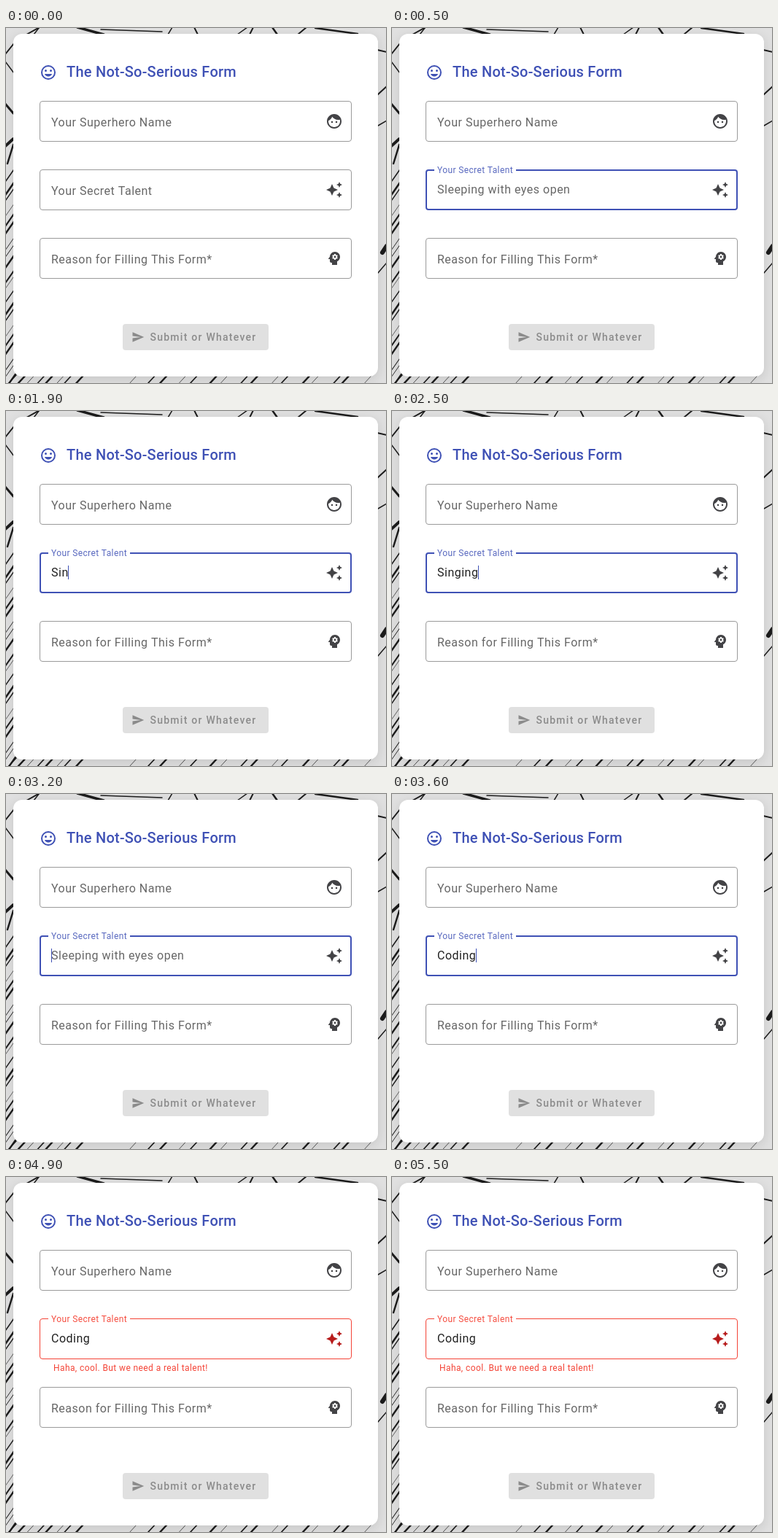
An HTML page with a canvas that plays this animation: 521x487 px, repeating every 5700 ms.

```html
<!DOCTYPE html>
<html lang="en">
<head>
<meta charset="utf-8">
<title>Form</title>
<style>
html, body { margin: 0; width: 100%; height: 100%; overflow: hidden; background: #e0e0e0; }
canvas { display: block; }
</style>
</head>
<body>
<canvas id="stage" width="521" height="487"></canvas>
<script>
const ctx = document.getElementById('stage').getContext('2d');
const LOOP = 5700, STEP = 100;
const FOCUS = 50, BLUR = 4050;
const INDIGO = '#3f51b5', RED = '#f44336', ICON = '#434346';
const MUTED = 'rgba(0,0,0,.6)', INK = 'rgba(0,0,0,.87)';

// Input value from each time on
const TYPING = [
  [0, ''], [1700, 'S'], [1800, 'Si'], [1900, 'Sin'], [2000, 'Sing'],
  [2100, 'Singi'], [2300, 'Singin'], [2500, 'Singing'],
  [2800, 'Singin'], [3000, 'S'], [3200, ''],
  [3300, 'C'], [3400, 'Co'], [3500, 'Codi'], [3600, 'Coding']
];

const SEND = new Path2D('M2.01 21 23 12 2.01 3 2 10l15 2-15 2z');
const FACE = new Path2D('M12 2C6.48 2 2 6.48 2 12s4.48 10 10 10 10-4.48 10-10S17.52 2 12 2z' +
  'm0 18c-4.41 0-8-3.59-8-8 0-.29.02-.58.05-.86 2.36-1.05 4.23-2.98 5.21-5.37' +
  'C11.07 8.33 14.05 10 17.42 10c.78 0 1.53-.09 2.25-.26.21.71.33 1.47.33 2.26 0 4.41-3.59 8-8 8z');
const SPARKLE = new Path2D('M19 9l1.25-2.75L23 5l-2.75-1.25L19 1l-1.25 2.75L15 5l2.75 1.25z' +
  'M11.5 9.5L9 4 6.5 9.5 1 12l5.5 2.5L9 20l2.5-5.5L17 12z' +
  'M19 15l-1.25 2.75L15 19l2.75 1.25L19 23l1.25-2.75L23 19l-2.75-1.25z');
const HEAD = new Path2D('M13 3C9.25 3 6.2 5.94 6.02 9.64L4.1 12.2c-.25.33-.01.8.4.8H6v3' +
  'c0 1.1.9 2 2 2h1v3h7v-4.68c2.36-1.12 4-3.53 4-6.32 0-3.87-3.13-7-7-7z');
const SMILE = new Path2D('M12 17.5c2.33 0 4.31-1.46 5.11-3.5H6.89c.8 2.04 2.78 3.5 5.11 3.5z');

const clamp = v => Math.min(1, Math.max(0, v));
const ease = p => p * p * (3 - 2 * p);

function text(str, x, y, size, color, spacing, weight = 400) {
  ctx.font = `${weight} ${size}px Roboto, sans-serif`;
  ctx.letterSpacing = spacing + 'px';
  ctx.fillStyle = color;
  ctx.fillText(str, x, y);
  return ctx.measureText(str).width;
}

function line(x1, y1, x2, y2, w) {
  ctx.lineWidth = w;
  ctx.beginPath();
  ctx.moveTo(x1, y1);
  ctx.lineTo(x2, y2);
  ctx.stroke();
}

function dot(x, y, r) {
  ctx.beginPath();
  ctx.arc(x, y, r, 0, Math.PI * 2);
  ctx.fill();
}

// Runs a drawing on a 24-unit icon grid
function icon(x, y, size, color, draw) {
  ctx.save();
  ctx.translate(x, y);
  ctx.scale(size / 24, size / 24);
  ctx.fillStyle = ctx.strokeStyle = color;
  draw();
  ctx.restore();
}

function mood() {
  ctx.lineWidth = 2;
  ctx.beginPath();
  ctx.arc(12, 12, 9, 0, Math.PI * 2);
  ctx.stroke();
  dot(8.5, 9.5, 1.5);
  dot(15.5, 9.5, 1.5);
  ctx.fill(SMILE);
}

function face() {
  ctx.fill(FACE, 'evenodd');
  dot(9, 13, 1.25);
  dot(15, 13, 1.25);
}

function mind() {
  ctx.fill(HEAD);
  ctx.fillStyle = ctx.strokeStyle = '#fff';
  dot(13, 10, 3);
  for (let i = 0; i < 6; i++) {
    const a = Math.PI * (i / 3 + 1 / 6 + 1 / 3);
    line(13, 10, 13 + 3.9 * Math.cos(a), 10 + 3.9 * Math.sin(a), 2);
  }
  ctx.fillStyle = ICON;
  dot(13, 10, 1.43);
}

function backdrop() {
  ctx.fillStyle = '#e0e0e0';
  ctx.fillRect(0, 0, 521, 487);
  ctx.strokeStyle = '#1c1c1c';
  ctx.lineCap = 'round';
  [
    [28, 9, 46, -1, 2], [38, 9, 45, 0, 1.5], [98, -1, 134, 9, 3.5],
    [130, 2, 214, 5, 1.5], [228, -1, 222, 9, 1.5], [258, -1, 263, 9, 2],
    [317, 9, 331, -1, 1.5], [339, -1, 334, 9, 2], [365, -1, 372, 9, 2.5],
    [400, 9, 412, -1, 2], [424, 0, 482, 8, 2.5],
    [509, 30, 522, 33, 2], [509, 92, 522, 80, 2], [510, 134, 522, 127, 1.5],
    [516, 308, 522, 299, 6], [510, 336, 522, 322, 1.5],
    [-1, 36, 11, 21, 2], [-1, 46, 11, 62, 1.5], [-1, 104, 10, 117, 3],
    [-1, 162, 10, 152, 4], [2, 186, 10, 160, 2.5]
  ].forEach(s => line(...s));
  // Diagonal hatching down the left side and along the bottom
  for (let i = 0; i < 20; i++) {
    const y = 204 + i * 15 + 4 * Math.sin(i * 2.3);
    line(-3, y + 10, 13, y - 13, 1.6 + Math.sin(i * 1.7));
  }
  for (let i = 0; i < 24; i++) {
    const x = 8 + i * (i < 8 ? 13 : 21) + 6 * Math.sin(i * 3.1);
    line(x - 6, 489, x + 6, 476, 1.6 + Math.sin(i * 2.1));
  }
  ctx.lineCap = 'butt';
}

function card() {
  ctx.save();
  ctx.shadowColor = 'rgba(0,0,0,.12)';
  ctx.shadowBlur = 16;
  ctx.shadowOffsetY = 4;
  ctx.fillStyle = '#fff';
  ctx.beginPath();
  ctx.roundRect(10, 8, 500, 470, 12);
  ctx.fill();
  ctx.restore();
}

function outline(y, color, w) {
  ctx.strokeStyle = color;
  ctx.lineWidth = w;
  ctx.beginPath();
  ctx.roundRect(46 + w / 2, y + w / 2, 428 - w, 56 - w, 4 - w / 2);
  ctx.stroke();
}

function plainField(y, label, draw) {
  outline(y, '#9a9a9a', 1);
  text(label, 62, y + 35, 16, MUTED, 0.5);
  icon(438, y + 16, 24, ICON, draw);
}

function caretOn(t) {
  if (t < FOCUS || t >= BLUR) return false;
  if (t < 1700) return t < 500 || (t >= 1000 && t < 1500);
  return true;
}

function talentField(t) {
  const value = TYPING.filter(k => k[0] <= t).pop()[1];
  const focused = t >= FOCUS && t < BLUR, failed = t >= BLUR;
  const lift = ease(clamp((t - FOCUS) / 150));

  outline(194, failed ? RED : focused ? INDIGO : '#9a9a9a', focused ? 2 : 1);
  if (t >= FOCUS) {
    ctx.fillStyle = '#fff';
    ctx.fillRect(58, 193, 112, 4);
  }

  const tint = failed ? 'rgba(244,67,54,.95)' : focused ? 'rgba(63,81,181,.87)' : MUTED;
  const size = 16 - 4 * lift;
  text('Your Secret Talent', 62, 229 - 30 * lift, size, tint, size / 32);

  if (value) {
    text(value, 62, 227, 16, INK, 0.5);
  } else if (t >= FOCUS) {
    ctx.globalAlpha = clamp((t - FOCUS - 60) / 67);
    text('Sleeping with eyes open', 62, 227, 16, MUTED, 0.5);
    ctx.globalAlpha = 1;
  }
  if (caretOn(t)) {
    ctx.font = '400 16px Roboto, sans-serif';
    ctx.letterSpacing = '0.5px';
    ctx.fillStyle = INDIGO;
    ctx.fillRect(62 + Math.floor(ctx.measureText(value).width), 212, 1, 19);
  }
  icon(438, 210, 24, failed ? '#b71c1c' : ICON, () => ctx.fill(SPARKLE));

  if (failed) {
    const p = clamp((t - BLUR) / 300);
    ctx.globalAlpha = p * p;
    text('Haha, cool. But we need a real talent!', 65, 266 - 5 * (1 - p * p), 12, RED, 0.4);
    ctx.globalAlpha = 1;
  }
}

function button() {
  ctx.fillStyle = '#e0e0e0';
  ctx.beginPath();
  ctx.roundRect(160, 406, 200, 36, 4);
  ctx.fill();
  icon(172, 415, 18, '#8b8b8b', () => ctx.fill(SEND));
  text('Submit or Whatever', 197.5, 429, 14, '#8b8b8b', 1.25, 500);
}

function draw(now) {
  const t = Math.floor((now % LOOP) / STEP) * STEP;
  backdrop();
  card();
  icon(46, 49, 24, INDIGO, mood);
  text('The Not-So-Serious Form', 83, 67, 20, INDIGO, 0.25, 500);
  plainField(100, 'Your Superhero Name', face);
  talentField(t);
  plainField(288, 'Reason for Filling This Form*', mind);
  button();
}

const start = performance.now();
function tick() {
  draw(performance.now() - start);
  requestAnimationFrame(tick);
}
tick();
</script>
</body>
</html>
```
